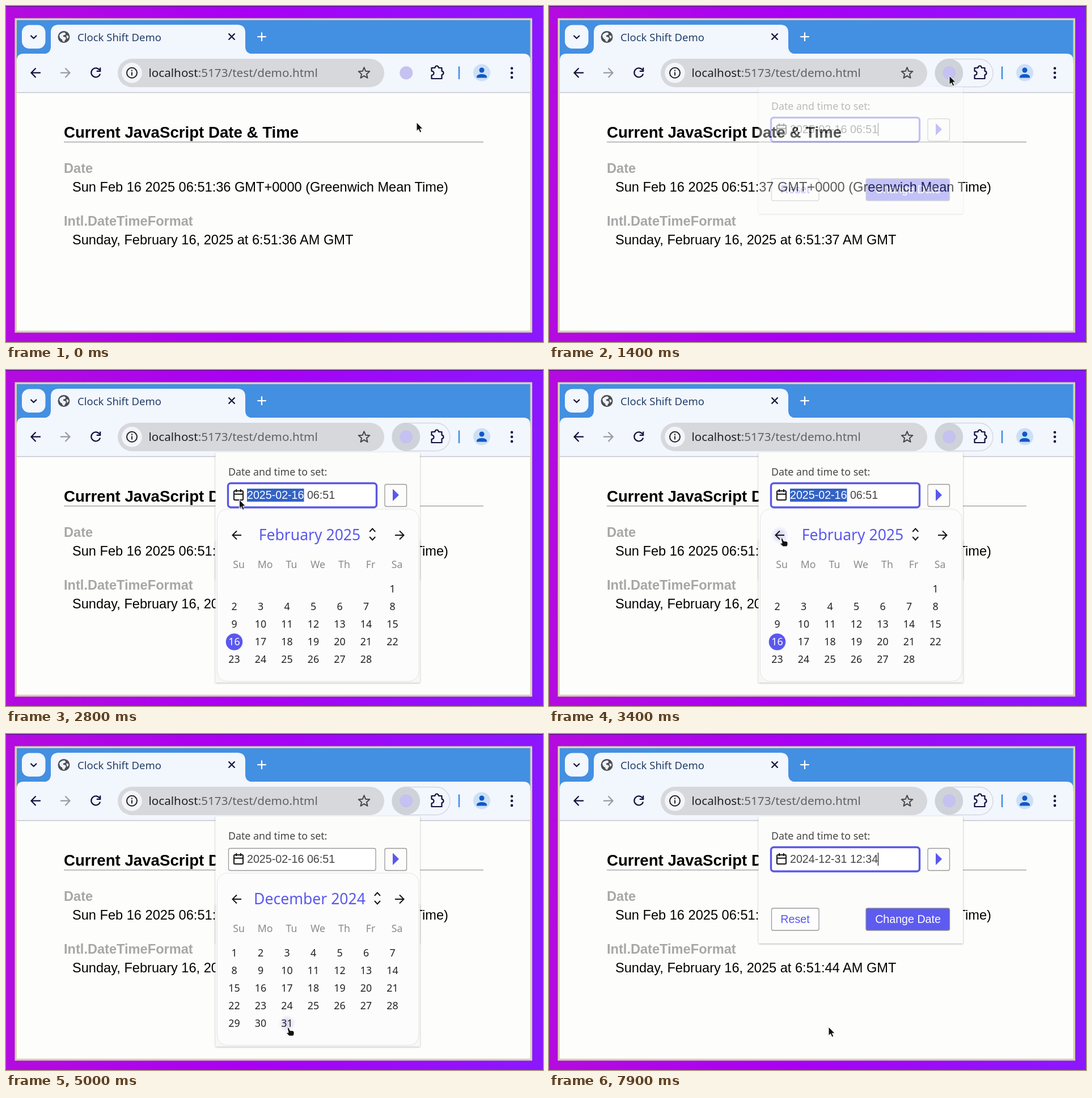
Animation, 947 px wide and 592 px high, one loop 8 s. Source, as an HTML page:

```html
<!DOCTYPE html>
<html lang="en">
<head>
<meta charset="utf-8">
<title>Clock Shift Demo</title>
<style>
  html, body { margin: 0; width: 100%; height: 100%; overflow: hidden; background: #a80af0; }
  svg { display: block; width: 100vw; height: 100vh; }
  text { white-space: pre; }
  .ui { font-family: "Noto Sans", sans-serif; }
  .page { font-family: "Liberation Sans", Arial, sans-serif; font-size: 23.6px; }
  .field { font-family: "Liberation Sans", Arial, sans-serif; font-size: 19.65px; }
  .label { font-weight: bold; fill: #a7a7a7; }
  .mid { text-anchor: middle; }
  .line { fill: none; stroke: #10103c; stroke-width: 2.2; }
  .ink { fill: none; stroke: #151515; stroke-width: 2; }
</style>
</head>
<body>
<svg id="stage" viewBox="0 0 947 592" preserveAspectRatio="none">
  <defs>
    <linearGradient id="purple">
      <stop offset="0" stop-color="#b40bdf"/>
      <stop offset=".45" stop-color="#a900f4"/>
      <stop offset="1" stop-color="#8b18ff"/>
    </linearGradient>
    <radialGradient id="glow">
      <stop offset=".3" stop-color="#dcdaf8"/>
      <stop offset="1" stop-color="#dcdaf8" stop-opacity="0"/>
    </radialGradient>
    <filter id="shadow" x="-10%" y="-10%" width="120%" height="120%">
      <feDropShadow dx="0" dy="1" stdDeviation="1.8" flood-color="#000" flood-opacity=".3"/>
    </filter>
  </defs>

  <rect width="947" height="592" fill="url(#purple)"/>
  <rect width="947" height="1" fill="#480b70"/>
  <rect x="15.5" y="21.5" width="912.5" height="554" fill="#d5d3ad"/>
  <rect x="19" y="25" width="905.5" height="547" fill="#fdfdfc"/>

  <!-- tab strip -->
  <rect x="19" y="25" width="905.5" height="75" fill="#438fe2"/>
  <path d="M19 152V96Q19 84 31 84H912.5Q924.5 84 924.5 96V152Z" fill="#f2f6fd"/>
  <path d="M66 84.5Q79 84 79 71V47Q79 33 93 33H408Q422 33 422 47V71Q422 84 435 84.5Z" fill="#f2f6fd"/>
  <rect x="28" y="33.5" width="41.5" height="41.5" rx="13" fill="#f2f6fd"/>
  <path class="line" d="M43.5 52L48.7 57L54 52"/>
  <circle cx="102" cy="54.5" r="10.5" fill="#4a4d52"/>
  <path d="M94 52Q96 47 103 46.500Q107 49 104 51Q100 51 101 54L105 55Q107 58 104 60L103 63Q99 63 99 59Q95 58 94 52ZM106 52Q110 51 110.500 55L108 58Z" fill="#eef2f8"/>
  <text class="ui" x="126" y="61.500" font-size="18.5" fill="#223e68">Clock Shift Demo</text>
  <path class="line" d="M392.500 48.500L403.500 59.500M403.500 48.500L392.500 59.500"/>
  <path d="M451 46.500V62M443.300 54.200H458.700" stroke="#fff" stroke-width="2.2"/>

  <!-- toolbar -->
  <path d="M19 152.500H924.500" stroke="#c3c5ce" stroke-width="1.5"/>
  <path class="line" d="M61 117.700H45M52.500 109.500L44.500 117.700L52.500 126"/>
  <path class="line" style="stroke:#9899a6" d="M96 117.700H112M104.500 109.500L112.500 117.700L104.500 126"/>
  <path class="line" d="M165 113A8 8 0 1 0 166 119.500M166.200 108.500V114.800H159.800"/>
  <rect x="197" y="93" width="470" height="50" rx="25" fill="#d7d8db"/>
  <circle cx="222" cy="117.800" r="17.8" fill="#f3f5fb"/>
  <circle cx="222" cy="117.800" r="9" fill="none" stroke="#222" stroke-width="2"/>
  <path d="M222 116.500V122.500M222 112.500V114.700" stroke="#222" stroke-width="2"/>
  <text class="ui" x="251.500" y="125" font-size="20.65" fill="#202124">localhost<tspan fill="#5f6165">:5173/test/demo.html</tspan></text>
  <path id="star" fill="none" stroke="#45474c" stroke-width="2" stroke-linejoin="round"/>
  <rect id="extPill" x="681" y="93.500" width="102" height="49" rx="24.5" fill="none" stroke="#d3d6dd" stroke-width="1.3"/>
  <circle id="extHover" cx="705.500" cy="117.800" r="24.7" fill="#ced3d9"/>
  <circle cx="705.800" cy="117.800" r="11.5" fill="#c5c1f0"/>
  <path class="line" stroke-linejoin="round" d="M750.500 109H756.500Q756.800 105.500 759.700 105.500T763 109H768.500V114.700Q771.500 115 771.500 118T768.500 121.300V128H750.500V122Q754.500 121.500 754.500 118.300T750.500 114.700Z"/>
  <path d="M799 106.500V129" stroke="#438fe2" stroke-width="2.6"/>
  <circle cx="839" cy="117.500" r="15" fill="#cbdff7"/>
  <path d="M830 126.500V124.500Q831 120 839 120T848 124.500V126.500Z" fill="#1257c6"/>
  <circle cx="839" cy="113" r="4.5" fill="#1257c6"/>
  <g fill="#10103c"><circle cx="892" cy="109.700" r="2.3"/><circle cx="892" cy="117.800" r="2.3"/><circle cx="892" cy="125.900" r="2.3"/></g>

  <!-- page -->
  <g class="page">
    <text x="102" y="231.800" style="font-size:27.65px" font-weight="bold">Current JavaScript Date &amp; Time</text>
    <path d="M102 239.700H842" stroke="#999" stroke-width="1.2"/>
    <text class="label" x="102" y="294">Date</text>
    <text id="dateText" x="117" y="327"/>
    <text class="label" x="102" y="386.500">Intl.DateTimeFormat</text>
    <text id="intlText" x="117" y="419.500"/>
  </g>

  <!-- popup -->
  <g id="popup">
    <rect id="panel" x="369.500" y="145" width="360.500" height="224" rx="1.5" fill="#fcfcfb" filter="url(#shadow)"/>
    <text class="ui" x="392" y="186" font-size="17.8" fill="#454545">Date and time to set:</text>
    <rect id="box" fill="#fff"/>
    <rect id="iconGlow" x="399" y="208" width="22" height="24" rx="4" fill="#dcdaf8"/>
    <path id="icon" class="ink" d="M402 214.500Q402 213 403.500 213H416.500Q418 213 418 214.500V227.500Q418 229 416.500 229H403.500Q402 229 402 227.500ZM402 218.700H418M406 210V215M414 210V215"/>
    <rect id="selection" y="209" height="23" fill="#3262c6"/>
    <text class="field" id="value" x="425" y="227" fill="#454545"><tspan id="dayPart"></tspan><tspan> </tspan><tspan id="timePart"></tspan></text>
    <rect id="caret" y="209" width="1.3" height="23" fill="#222"/>
    <rect x="668" y="201.500" width="38.500" height="39" rx="3" fill="#fcfcfb" stroke="#999" stroke-width="1.3"/>
    <path d="M682 209.500L693 220.200L682 231Z" fill="#5a58ee"/>
    <g class="field mid">
      <rect x="392.500" y="307" width="83.500" height="39" rx="3" fill="#fdfdfd" stroke="#999" stroke-width="1.3"/>
      <text x="434" y="333" fill="#5a58ee">Reset</text>
      <rect x="559" y="307" width="147.500" height="39" rx="3" fill="#5d5bf0" stroke="#8a8a9c" stroke-width="1.3"/>
      <text x="633" y="333" fill="#fff">Change Date</text>
    </g>
    <g id="calendar">
      <rect x="369.500" y="300" width="360.500" height="250.500" fill="#f7f7f6" filter="url(#shadow)"/>
      <rect x="372.500" y="245" width="355.500" height="303.500" rx="18" fill="#fcfcfc" stroke="#e4e4e6"/>
      <circle id="arrowGlow" cx="407" cy="291" r="16" fill="url(#glow)"/>
      <path class="ink" d="M415 291H400M407 283.500L399.500 291L407 298.500M686 291H701M694 283.500L701.500 291L694 298.500"/>
      <text id="month" class="ui mid" x="535.500" y="300" font-size="26.55" fill="#5a58ee"/>
      <path id="stepper" class="ink" d="M-5 285L0 279.500L5 285M-5 294L0 299.500L5 294"/>
      <g id="weekdays" class="ui mid" font-size="17.7" fill="#8b8b8b"></g>
      <g id="days" class="ui mid" font-size="17.8"></g>
    </g>
  </g>

  <g id="pointer">
    <path id="arrow" d="M0 0V15.500L3.500 12.300L6 18L8.800 16.800L6.300 11.300H11Z" fill="#111" stroke="#fff" stroke-width="1"/>
    <path id="hand" d="M3.500 2Q4.500 .5 6 2L8 6.500Q13.500 6 15 8.500V13L13.500 16H6.500L2 11.500Q1.500 9 5 10.300L3.300 3Z" fill="#111" stroke="#fff" stroke-width="1"/>
  </g>
</svg>
<script>
const LOOP = 8000;
const FIRST_TICK = 700;
const byId = id => document.getElementById(id);
const clamp = v => Math.min(1, Math.max(0, v));
const ramp = (t, from, to) => clamp((t - from) / (to - from));
const within = (t, from, to) => t >= from && t < to;
const show = (id, on) => byId(id).setAttribute('visibility', on ? 'inherit' : 'hidden');
const set = (id, attrs) => { for (const k in attrs) byId(id).setAttribute(k, attrs[k]); };
const write = (id, s) => { if (byId(id).textContent !== s) byId(id).textContent = s; };

// pointer hot spot: time, x, y
const route = [
  [0, 724, 205], [450, 724, 205], [1050, 706, 123], [1550, 706, 123], [2150, 412, 222],
  [2700, 412, 222], [3250, 406, 295], [4150, 406, 295], [4800, 493, 516], [LOOP, 493, 516]
];
// name, first weekday, length, selected day
const months = [['February 2025', 6, 28, 16], ['January 2025', 3, 31, 0], ['December 2024', 0, 31, 0]];
const typing = [[0, '06:51'], [6600, '1'], [6800, '12'], [7050, '12:'], [7300, '12:3'], [7500, '12:34']];

function pointerAt(t) {
  const i = Math.max(1, route.findIndex(p => p[0] > t));
  const [a, b] = [route[i - 1], route[i]];
  const u = ramp(t, a[0], b[0]);
  const k = u * u * (3 - 2 * u);
  return [a[1] + (b[1] - a[1]) * k, a[2] + (b[2] - a[2]) * k];
}

function dayCell(day, first, picked, hovered) {
  const slot = first + day - 1;
  const x = 402.5 + 46.5 * (slot % 7), y = 386 + 31 * Math.floor(slot / 7);
  const disc = day === picked ? `<circle cx="${x}" cy="${y - 7 + 7}" r="14.8" fill="#5a58ee"/>`
    : day === hovered ? `<circle cx="${x}" cy="${y}" r="15" fill="url(#glow)"/>` : '';
  return `${disc}<text x="${x}" y="${y + 6.4}" fill="${day === picked ? '#fff' : '#222'}">${day}</text>`;
}

let drawnMonth = '';
function drawMonth(index, hovered, clicked) {
  const key = [index, hovered, clicked].join();
  if (key === drawnMonth) return;
  drawnMonth = key;
  const [name, first, length, chosen] = months[index];
  write('month', name);
  const edge = 535.5 + byId('month').getComputedTextLength() / 2;
  set('stepper', { transform: `translate(${edge + 21} 0)` });
  byId('days').innerHTML = Array.from({ length },
    (_, i) => dayCell(i + 1, first, clicked ? 31 : chosen, hovered)).join('');
}

function drawField(t) {
  const focused = !within(t, 3600, 5400);
  set('box', focused
    ? { x: 391.5, y: 199.5, width: 262, height: 42.5, rx: 5, stroke: '#5a57e6', 'stroke-width': 3.4 }
    : { x: 392.5, y: 201.5, width: 259.5, height: 39, rx: 3, stroke: '#999', 'stroke-width': 1.3 });
  const pickedDay = within(t, 2650, 3600) || within(t, 5400, 5900);
  const pickedTime = within(t, 5900, 6600);
  write('dayPart', t < 5400 ? '2025-02-16' : '2024-12-31');
  write('timePart', typing.filter(s => s[0] <= t).pop()[1]);
  set('dayPart', { fill: pickedDay ? '#fff' : '#454545' });
  set('timePart', { fill: pickedTime ? '#fff' : '#454545' });
  show('selection', pickedDay || pickedTime);
  set('selection', pickedTime ? { x: 531, width: 49.5 } : { x: 425, width: 100.5 });
  show('caret', within(t, 1250, 1800) || t >= 6600);
  set('caret', { x: 425 + byId('value').getComputedTextLength() - .3 });
  const hover = within(t, 2100, 2700);
  show('iconGlow', hover);
  set('icon', { style: `stroke:${hover ? '#17104a' : '#151515'}` });
}

function render(t) {
  const second = 36 + Math.floor((t - FIRST_TICK) / 1000 + 1);
  write('dateText', `Sun Feb 16 2025 06:51:${second} GMT+0000 (Greenwich Mean Time)`);
  write('intlText', `Sunday, February 16, 2025 at 6:51:${second} AM GMT`);

  set('extHover', { opacity: ramp(t, 900, 1100) });
  set('extPill', { opacity: ramp(t, 1150, 1300) });
  const open = ramp(t, 1290, 1600);
  show('popup', open > 0);
  set('popup', { opacity: open, transform: `translate(0 ${-4.5 * (1 - open)})` });
  drawField(t);

  const shown = ramp(t, 2650, 2800) * (1 - ramp(t, 5400, 5550));
  show('calendar', shown > 0);
  set('calendar', { opacity: shown });
  const onDay = t >= 4750;
  drawMonth(t < 3600 ? 0 : t < 4000 ? 1 : 2, onDay ? 31 : 0, t >= 5300);
  show('arrowGlow', within(t, 3150, 4250));

  const [x, y] = pointerAt(t);
  set('pointer', { transform: `translate(${x.toFixed(2)} ${y.toFixed(2)})` });
  const hand = within(t, 2100, 2700) || within(t, 3150, 5500);
  show('hand', hand);
  show('arrow', !hand);
}

set('star', {
  d: 'M' + Array.from({ length: 10 }, (_, i) => {
    const r = i % 2 ? 4.6 : 10.3, a = i * Math.PI / 5;
    return `${(631.5 + r * Math.sin(a)).toFixed(2)} ${(118.5 - r * Math.cos(a)).toFixed(2)}`;
  }).join('L') + 'Z'
});
byId('weekdays').innerHTML = ['Su', 'Mo', 'Tu', 'We', 'Th', 'Fr', 'Sa']
  .map((d, i) => `<text x="${410.5 + 46.5 * i}" y="348.500">${d}</text>`).join('');

const start = performance.now();
function frame() {
  render((performance.now() - start) % LOOP);
  requestAnimationFrame(frame);
}
frame();
</script>
</body>
</html>
```
